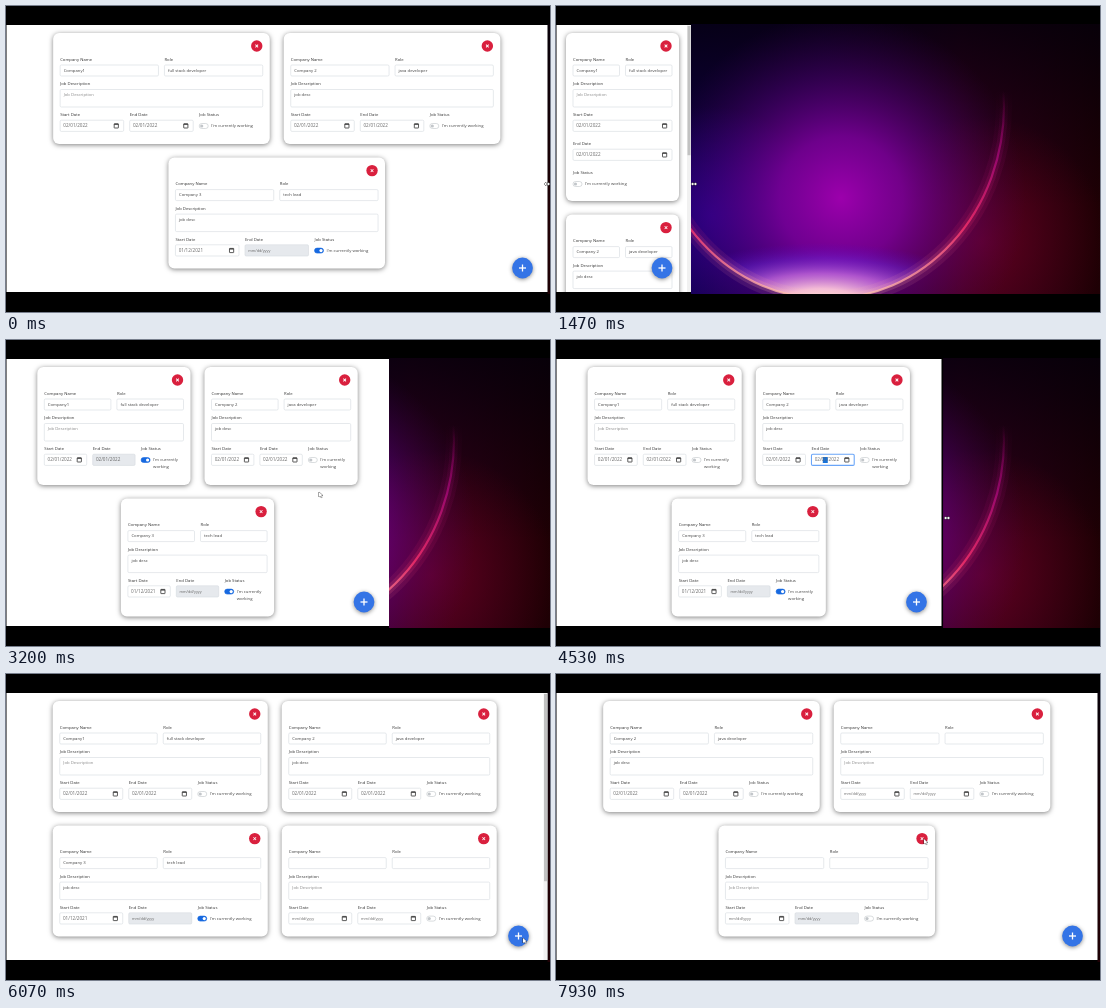
An HTML page with a canvas that plays this animation: 544x306 px, repeating every 8 s.

```html
<!DOCTYPE html>
<html lang="en">
<head>
<meta charset="utf-8">
<title>Responsive form cards</title>
<style>
  html, body { margin: 0; width: 100%; height: 100%; overflow: hidden; background: #000; }
  canvas { display: block; width: 544px; height: 306px; }
</style>
</head>
<body>
<canvas id="stage" width="544" height="306"></canvas>
<script>
const LOOP = 8000;
const LAG = 50;
const TOP = 19, BOTTOM = 286;
const GAP = 14, PAD = 7;
const WIDE = 541.5, NARROW = 135, MEDIUM = 383;
const canvas = document.getElementById('stage');
const ctx = canvas.getContext('2d');

const first = { name: 'Company1', role: 'full stack developer', start: '02/01/2022', end: '02/01/2022' };
const second = { name: 'Company 2', role: 'java developer', desc: 'job desc', start: '02/01/2022', end: '02/01/2022' };
const third = { name: 'Company 3', role: 'tech lead', desc: 'job desc', start: '01/12/2021', on: true };
const blankA = {}, blankB = {};

// Where the pointer goes; a stop without a place returns to the window edge.
const stops = [
  { at: 2250, x: 21, y: 179 },
  { at: 2650 },
  { at: 3200, x: 313, y: 152 },
  { at: 3780, x: 140, y: 120 },
  { at: 4020, x: 268, y: 119 },
  { at: 4270 },
  { at: 5750, x: 517, y: 264 },
  { at: 6900, x: 251, y: 41 },
  { at: 7350, x: 480, y: 41 },
  { at: 7900, x: 368, y: 165 }
];

const ramp = (t, start, end) => Math.min(1, Math.max(0, (t - start) / (end - start)));
const mix = (a, b, k) => a + (b - a) * k;
const smooth = k => k * k * (3 - 2 * k);

function browserWidth(t) {
  const shrink = 1 - (1 - ramp(t, 110, 1400)) ** 1.5;
  const grow = ramp(t, 2720, 3060);
  const widen = ramp(t, 4270, 5420) ** 2.8;
  return WIDE - (WIDE - NARROW) * shrink + (MEDIUM - NARROW) * grow + (WIDE - MEDIUM) * widen;
}

function gradient(g, colors) {
  colors.forEach((color, i) => g.addColorStop(i / (colors.length - 1), color));
  return g;
}

function makeWallpaper() {
  const c = document.createElement('canvas');
  c.width = 544;
  c.height = 306;
  const g = c.getContext('2d');
  const wash = (fill) => { g.fillStyle = fill; g.fillRect(0, 0, 544, 306); };
  const glow = (x, y, r, ...colors) => wash(gradient(g.createRadialGradient(x, y, 0, x, y, r), colors));

  wash(gradient(g.createLinearGradient(130, 0, 544, 0), ['#12004c', '#26004c', '#3a0020', '#1e0004']));
  wash(gradient(g.createLinearGradient(0, 18, 0, 200), ['rgba(2,0,10,.8)', 'rgba(2,0,10,0)']));
  glow(155, 210, 110, 'rgba(50,0,190,.5)', 'rgba(50,0,190,0)');
  glow(425, 235, 125, 'rgba(125,0,40,.6)', 'rgba(110,0,20,0)');
  glow(285, 192, 185, '#9c00ac', 'rgba(130,0,160,.8)', 'rgba(90,0,130,.4)', 'rgba(60,0,90,0)');

  const globe = new Path2D();
  globe.ellipse(271, 100, 177, 193, 0, 0, 7);
  g.save();
  g.clip(globe);
  g.translate(265, 298);
  g.scale(1, .36);
  g.fillStyle = gradient(g.createRadialGradient(0, 0, 0, 0, 0, 170),
    ['#fff0d8', '#f4bcd6', 'rgba(195,105,225,.8)', 'rgba(110,40,220,.45)', 'rgba(80,0,190,0)']);
  g.fillRect(-250, -300, 500, 400);
  g.restore();

  g.strokeStyle = gradient(g.createLinearGradient(0, 85, 0, 290),
    ['rgba(170,0,120,0)', '#a80a78', '#f8306c', '#ffc4b0']);
  [[16, .1], [8, .18], [2.2, .8]].forEach(([width, alpha]) => {
    g.lineWidth = width;
    g.globalAlpha = alpha;
    g.stroke(globe);
  });
  return c;
}
const wallpaper = makeWallpaper();

function text(str, x, y, color = '#444', size = 4.25) {
  ctx.font = `${size}px "Open Sans", sans-serif`;
  ctx.fillStyle = color;
  ctx.fillText(str, x, y);
}

function box(x, y, w, h, r, fill, stroke, lineWidth = .6) {
  ctx.beginPath();
  ctx.roundRect(x, y, w, h, r);
  if (fill) { ctx.fillStyle = fill; ctx.fill(); }
  if (stroke) { ctx.strokeStyle = stroke; ctx.lineWidth = lineWidth; ctx.stroke(); }
}

function disc(x, y, r, color) {
  ctx.beginPath();
  ctx.arc(x, y, r, 0, 7);
  ctx.fillStyle = color;
  ctx.fill();
}

function plus(x, y, r, width, angle = 0) {
  ctx.save();
  ctx.translate(x, y);
  ctx.rotate(angle);
  ctx.fillStyle = '#fff';
  ctx.fillRect(-r, -width / 2, 2 * r, width);
  ctx.fillRect(-width / 2, -r, width, 2 * r);
  ctx.restore();
}

function shadow(color, blur, y) {
  ctx.shadowColor = color;
  ctx.shadowBlur = blur;
  ctx.shadowOffsetY = y;
}

function field(label, value, x, y, w, h, placeholder) {
  text(label, x, y, '#333');
  box(x, y + 5.5, w, h, 1.2, '#fff', '#d6dadf');
  if (value || placeholder) text(value || placeholder, x + 3.5, y + 11.2, value ? '#444' : '#8a8a8a');
}

function dateField(label, value, x, y, w, disabled, focused) {
  text(label, x, y, '#333');
  box(x, y + 5.2, w, 11.2, 1.2, disabled ? '#e6e9ed' : '#fff', focused ? '#6aa5f8' : '#d6dadf', focused ? 1.1 : .6);
  if (focused) box(x + 11.3, y + 8, 5, 6, 0, '#1a73d8');
  text(value || 'mm/dd/yyyy', x + 3.2, y + 11, '#666', value ? 4.6 : 3.8);
  if (disabled) return;
  box(x + w - 9.5, y + 8.8, 4.2, 4.2, .3, null, '#333', .8);
  box(x + w - 9.5, y + 8.8, 4.2, 1, 0, '#333');
}

function toggle(on, x, y) {
  box(x, y - 2.5, 9, 5, 2.5, on ? '#1769e0' : '#fff', on ? '#1769e0' : '#c2c6ca');
  disc(x + (on ? 6.5 : 2.5), y, 1.6, on ? '#fff' : '#c2c6ca');
}

function drawCard(card, x, y, page, state) {
  const { w, h, columns, wrapped } = page;
  shadow('rgba(0,0,0,.5)', 5, 1);
  box(x, y, w, h, 6, '#fff');
  shadow('transparent', 0, 0);
  disc(x + w - 13, y + 13, 5.7, '#d9203e');
  plus(x + w - 13, y + 13, 1.9, .8, Math.PI / 4);

  const left = x + PAD, inner = w - 2 * PAD, half = (inner - 6) / 2;
  field('Company Name', card.name, left, y + 26.5, half, 11);
  field('Role', card.role, left + half + 6, y + 26.5, half, 11);
  field('Job Description', card.desc, left, y + 51, inner, 17.5, 'Job Description');

  const col = (inner - 6 * (columns - 1)) / columns;
  const place = i => [left + (i % columns) * (col + 6), y + 82 + 29 * Math.floor(i / columns)];
  dateField('Start Date', card.start, ...place(0), col);
  dateField('End Date', card.end, ...place(1), col, state.disabled, state.focused);

  const [sx, sy] = place(2);
  text('Job Status', sx, sy, '#333');
  toggle(state.on, sx, sy + 11);
  const words = columns === 2 ? ['I\'m', 'currently', 'working']
    : wrapped ? ['I\'m currently', 'working'] : ['I\'m currently working'];
  words.forEach((word, i) => text(word, sx + 12, sy + 11 + i * 6.8));
}

function cardsAt(t) {
  const cards = [first, second, third];
  if (t >= 5750) cards.push(blankA);
  if (t >= 6050) cards.push(blankB);
  return cards.filter(c => !(c === first && t >= 6900) && !(c === third && t >= 7350));
}

function layout(width, count) {
  const w = Math.max(113, width * .4);
  const columns = width >= 280 ? 3 : width >= 162 ? 2 : 1;
  const wrapped = columns === 3 && (w - 26) / 3 < 53;
  const h = columns === 3 ? (wrapped ? 118 : 111) : columns === 2 ? 153 : 168;
  const perRow = width >= 254 ? 2 : 1;
  const pitch = h + 13.6;
  return { width, w, h, columns, wrapped, perRow, pitch, height: PAD + Math.ceil(count / perRow) * pitch };
}

function drawPage(t, total, visible) {
  const cards = cardsAt(t);
  const viewHeight = BOTTOM - TOP;
  let page = layout(total, cards.length);
  const overflow = page.height > viewHeight + 8;
  if (overflow) page = layout(total - 4, cards.length);
  const { width, w, perRow, pitch, height } = page;

  ctx.save();
  ctx.beginPath();
  ctx.rect(.5, TOP, visible - .5, viewHeight);
  ctx.clip();
  ctx.fillStyle = '#fff';
  ctx.fillRect(0, 0, 544, 306);

  cards.forEach((card, i) => {
    if (card === blankB && t < 6110) return;
    const row = Math.floor(i / perRow);
    const inRow = Math.min(perRow, cards.length - row * perRow);
    const rowWidth = inRow * (w + GAP) - GAP;
    const x = Math.max(10, (width - rowWidth) / 2) + (i % perRow) * (w + GAP);
    const switchedOn = card === first && t >= 2250 && t < 3780;
    drawCard(card, x, 27 + row * pitch, page, {
      on: card.on || switchedOn,
      disabled: i === 2 || switchedOn,
      focused: card === second && t >= 4020 && t < 5650
    });
  });

  if (overflow) {
    box(width, TOP, 4, viewHeight, 0, '#f1f1f1');
    box(width + .5, TOP + 1, 3, viewHeight * viewHeight / height, 0, '#c1c1c1');
  }
  shadow('rgba(0,0,0,.45)', 4, 1);
  disc(width - 25, 262, 10.4, '#3474e6');
  shadow('transparent', 0, 0);
  plus(width - 25, 262, 3.5, 1.3);
  ctx.restore();
}

function drawPointer(t) {
  const edge = { x: Math.min(541, browserWidth(t + LAG * 1.5) + 3), y: 178 };
  let { x, y } = edge, away = 0;
  for (const stop of stops) {
    const k = smooth(ramp(t, stop.at - 300, stop.at));
    const target = stop.x ? stop : edge;
    x = mix(x, target.x, k);
    y = mix(y, target.y, k);
    away = mix(away, stop.x ? 1 : 0, k);
  }

  ctx.save();
  ctx.translate(x, y);
  const shape = new Path2D(away < .05
    ? 'M-3 0 L-1 -1.6 V-.5 H1 V-1.6 L3 0 L1 1.6 V.5 H-1 V1.6 Z'
    : 'M0 0 V5 L1.3 3.9 L2.2 5.7 L3 5.3 L2.2 3.6 L3.7 3.4 Z');
  ctx.strokeStyle = '#222';
  ctx.lineWidth = .8;
  ctx.stroke(shape);
  ctx.fillStyle = '#fff';
  ctx.fill(shape);
  ctx.restore();
}

function draw(t) {
  const total = browserWidth(t);
  const next = browserWidth(t + LAG);
  const frame = next < total ? Math.min(WIDE, next + 6) : next;

  ctx.fillStyle = '#000';
  ctx.fillRect(0, 0, 544, 306);
  ctx.drawImage(wallpaper, 0, 18, 544, 270, 0, 18, 544, 270);
  ctx.fillRect(0, 18, frame, 270);
  drawPage(t, total, Math.min(total, next));
  drawPointer(t);
}

ctx.textBaseline = 'middle';
function tick() {
  draw(performance.now() % LOOP);
  requestAnimationFrame(tick);
}
tick();
</script>
</body>
</html>
```
